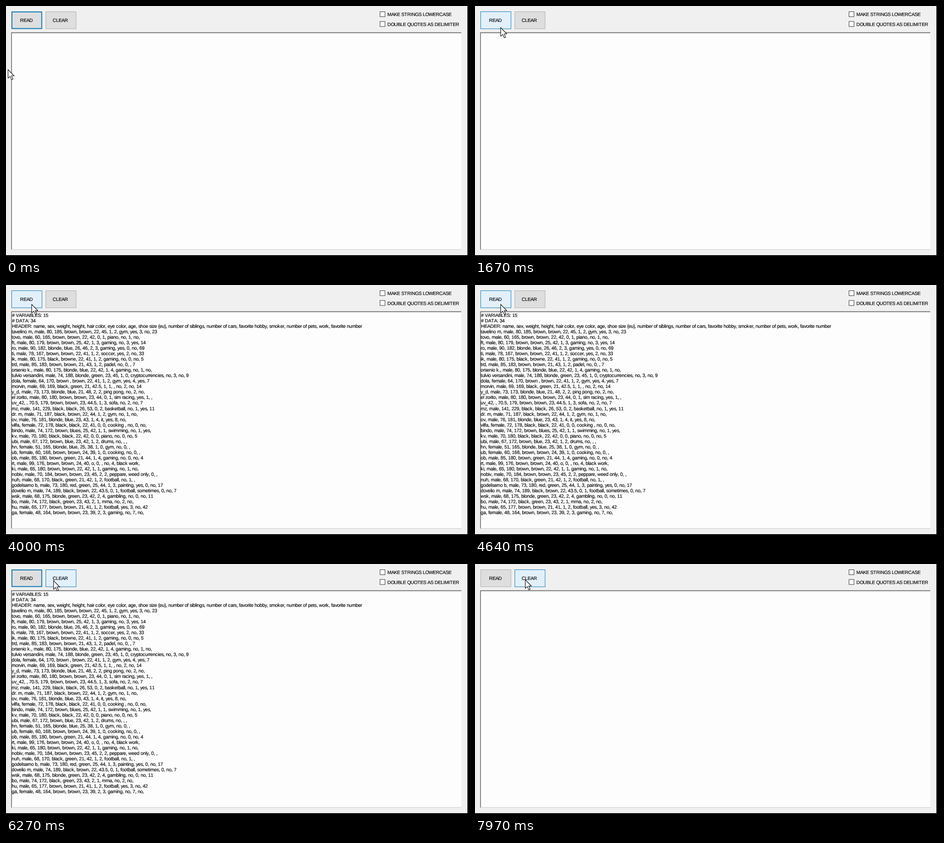
An HTML page that plays this animation: 1017 by 551 pixels, repeating every 8000 ms.

```html
<!DOCTYPE html>
<html lang="en">
<head>
<meta charset="utf-8">
<title>Reader form</title>
<style>
  html, body { margin: 0; width: 100%; height: 100%; overflow: hidden; background: #f0f0f0; }
  svg { display: block; width: 100%; height: 100%; }
  text {
    font: 10.5px "Liberation Sans", Arial, sans-serif;
    fill: #000;
    stroke: #000;
    stroke-width: 0.15px;
    white-space: pre;
    text-rendering: geometricPrecision;
    font-variant-ligatures: none;
    font-kerning: none;
  }
</style>
</head>
<body>
<svg id="stage" viewBox="0 0 1017 551"></svg>
<script>
const LOOP = 8000;
const SCALE = 0.925;      // the form is shown slightly reduced
const LINE = 12.03;
const READ_DOWN = 2930, READ_UP = 3180;
const CLEAR_DOWN = 6480, CLEAR_UP = 6640;

const head = `# VARIABLES: 15
# DATA: 34
HEADER: name, sex, weight, height, hair color, eye color, age, shoe size (eu), number of siblings, number of cars, favorite hobby, smoker, number of pets, work, favorite number`.split("\n");

const rows = `tavelino m, male, 80, 185, brown, brown, 22, 45, 1, 2, gym, yes, 3, no, 23
tovo, male, 60, 165, brown, brown, 22, 42, 0, 1, piano, no, 1, no,
ft, male, 80, 179, brown, brown, 25, 42, 1, 3, gaming, no, 3, yes, 14
ro, male, 90, 182, blonde, blue, 26, 46, 2, 3, gaming, yes, 0, no, 69
ti, male, 78, 167, brown, brown, 22, 41, 1, 2, soccer, yes, 2, no, 33
ik, male, 80, 175, black, browne, 22, 41, 1, 2, gaming, no, 0, no, 5
trd, male, 85, 183, brown, brown, 21, 43, 1, 2, padel, no, 0, , 7
orsenio k., male, 80, 175, blonde, blue, 22, 42, 1, 4, gaming, no, 1, no,
tulvio versandini, male, 74, 188, blonde, green, 23, 45, 1, 0, cryptocurrencies, no, 3, no, 9
dola, female, 64, 170, brown , brown, 22, 41, 1, 2, gym, yes, 4, yes, 7
morvin, male, 69, 169, black, green, 21, 42.5, 1, 1, , no, 2, no, 14
y_d, male, 73, 173, blonde, blue, 21, 48, 2, 2, ping pong, no, 2, no,
el zorito, male, 80, 180, brown, brown, 23, 44, 0, 1, sim racing, yes, 1, ,
uv_42, , 70.5, 179, brown, brown, 23, 44.5, 1, 3, sofa, no, 2, no, 7
mz, male, 141, 229, black, black, 26, 53, 0, 2, basketball, no, 1, yes, 11
dr. m, male, 71, 187, black, brown, 22, 44, 1, 2, gym, no, 1, no,
ov, male, 76, 181, blonde, blue, 23, 43, 1, 4, it, yes, 8, no,
vilfa, female, 72, 178, black, black, 22, 41, 0, 0, cooking , no, 0, no,
bindo, male, 74, 172, brown, blues, 25, 42, 1, 1, swimming, no, 1, yes,
kv, male, 70, 180, black, black, 22, 42, 0, 0, piano, no, 0, no, 5
ubi, male, 67, 172, brown, blue, 23, 42, 1, 2, drums, no, , ,
hn, female, 51, 165, blonde, blue, 25, 38, 1, 0, gym, no, 0, ,
ub, female, 60, 168, brown, brown, 24, 39, 1, 0, cooking, no, 0, ,
ob, male, 85, 180, brown, green, 21, 44, 1, 4, gaming, no, 0, no, 4
rt, male, 99, 176, brown, brown, 24, 40, o, 0, , no, 4, black work,
ki, male, 65, 180, brown, brown, 22, 42, 1, 1, gaming, no, 1, no,
nobiv, male, 70, 184, brown, brown, 23, 45, 2, 2, peppare, weed only, 0, ,
nuh, male, 68, 170, black, green, 21, 42, 1, 2, football, no, 1, ,
godelsarno b, male, 73, 180, red, green, 25, 44, 1, 3, painting, yes, 0, no, 17
dovelio m, male, 74, 189, black, brown, 22, 43.5, 0, 1, football, sometimes, 0, no, 7
wsk, male, 68, 175, blonde, green, 23, 42, 2, 4, gambling, no, 0, no, 11
bo, male, 74, 172, black, green, 23, 43, 2, 1, mma, no, 2, no,
hu, male, 65, 177, brown, brown, 21, 41, 1, 2, football, yes, 3, no, 42
ga, female, 48, 164, brown, brown, 23, 39, 2, 3, gaming, no, 7, no,`.split("\n");

const stage = document.getElementById("stage");
const ruler = document.createElement("canvas").getContext("2d");
ruler.font = '100px "Liberation Sans", Arial, sans-serif';

function add(tag, attrs, parent = stage) {
  const node = document.createElementNS("http://www.w3.org/2000/svg", tag);
  for (const key in attrs) node.setAttribute(key, attrs[key]);
  parent.appendChild(node);
  return node;
}

function rect(x, y, width, height, fill) {
  return add("rect", { x, y, width, height, fill });
}

// Whole-pixel advances, as a hinted 11px face has them; c and k round up.
function advance(ch) {
  const bias = "ck".includes(ch) ? 0.5 : 0.3;
  return Math.floor(ruler.measureText(ch).width * 0.11 + bias + 0.01) * SCALE;
}

function label(str, x, y, parent) {
  const xs = [];
  for (const ch of str) {
    xs.push(x.toFixed(2));
    x += advance(ch);
  }
  add("text", { x: xs.join(" "), y }, parent).textContent = str;
}

function button(str, x, textX) {
  const box = add("rect", {});
  label(str, textX, 35);
  return { x, y: 12, w: 67.5, h: 38.5, box };
}

const looks = {
  normal: ["#dedede", "#adadad", 1],
  focus: ["#dedede", "#0f78b4", 2],
  hover: ["#e2f0fa", "#0f78b4", 1],
  down: ["#c8e3f6", "#0a5590", 1]
};

function paint(b, look) {
  const [fill, stroke, line] = looks[look];
  const attrs = {
    x: b.x + line / 2, y: b.y + line / 2, width: b.w - line, height: b.h - line,
    fill, stroke, "stroke-width": line
  };
  for (const key in attrs) b.box.setAttribute(key, attrs[key]);
}

function checkbox(str, y) {
  add("rect", { x: 821.5, y: y + 0.5, width: 11, height: 11, fill: "#fff", stroke: "#333" });
  label(str, 837.8, y + 10.2);
}

rect(0, 0, 1017, 551, "#f0f0f0");
rect(1013.5, 0, 4, 551, "#000");
rect(0, 547, 1017, 4, "#000");

// sunken text box
rect(11, 57.5, 989, 477, "#a4a4a4");
rect(12, 58, 988, 476.5, "#696969");
rect(13, 59.5, 987, 475, "#fdfdfd");

const readBtn = button("READ", 12, 31);
const clearBtn = button("CLEAR", 87, 102.6);
checkbox("MAKE STRINGS LOWERCASE", 12);
checkbox("DOUBLE QUOTES AS DELIMITER", 33.5);

const output = add("g", {});
head.forEach((str, i) => label(str, 13.2, 70 + i * LINE, output));
rows.forEach((str, i) => label(str, 12.6, 70 + (i + head.length) * LINE, output));

const cursor = add("path", {
  d: "M0 0V18.8L4.4 14.8L7.8 22.4L10.8 21.1L7.5 13.8H13.3Z",
  fill: "#fff", stroke: "#000", "stroke-width": 1.1
});

// time, x, y of the pointer tip
const path = [
  [0, 4, 139], [1350, 55, 51], [1670, 56, 47], [2500, 56, 42],
  [4000, 56, 42], [5540, 56, 41], [5750, 56, 41], [6350, 106, 36],
  [6900, 106, 36], [7970, 110, 34], [LOOP, 110, 34]
];

function pointer(t) {
  const i = path.findIndex(p => p[0] > t);
  const [t0, x0, y0] = path[i - 1], [t1, x1, y1] = path[i];
  const u = (t - t0) / (t1 - t0), e = u * u * (3 - 2 * u);
  return [x0 + (x1 - x0) * e, y0 + (y1 - y0) * e];
}

function look(b, x, y, pressed, focused) {
  if (pressed) return "down";
  if (x >= b.x && x < b.x + b.w && y >= b.y && y < b.y + b.h) return "hover";
  return focused ? "focus" : "normal";
}

function draw(t) {
  const [x, y] = pointer(t);
  const cleared = t >= CLEAR_DOWN;
  paint(readBtn, look(readBtn, x, y, t >= READ_DOWN && t < READ_UP, !cleared));
  paint(clearBtn, look(clearBtn, x, y, cleared && t < CLEAR_UP, cleared));
  output.setAttribute("visibility", t >= READ_UP && t < CLEAR_UP ? "visible" : "hidden");
  cursor.setAttribute("transform", `translate(${Math.round(x) + 0.5} ${Math.round(y) + 0.5})`);
}

const start = performance.now();
function tick() {
  draw((performance.now() - start) % LOOP);
  requestAnimationFrame(tick);
}
tick();
</script>
</body>
</html>
```
